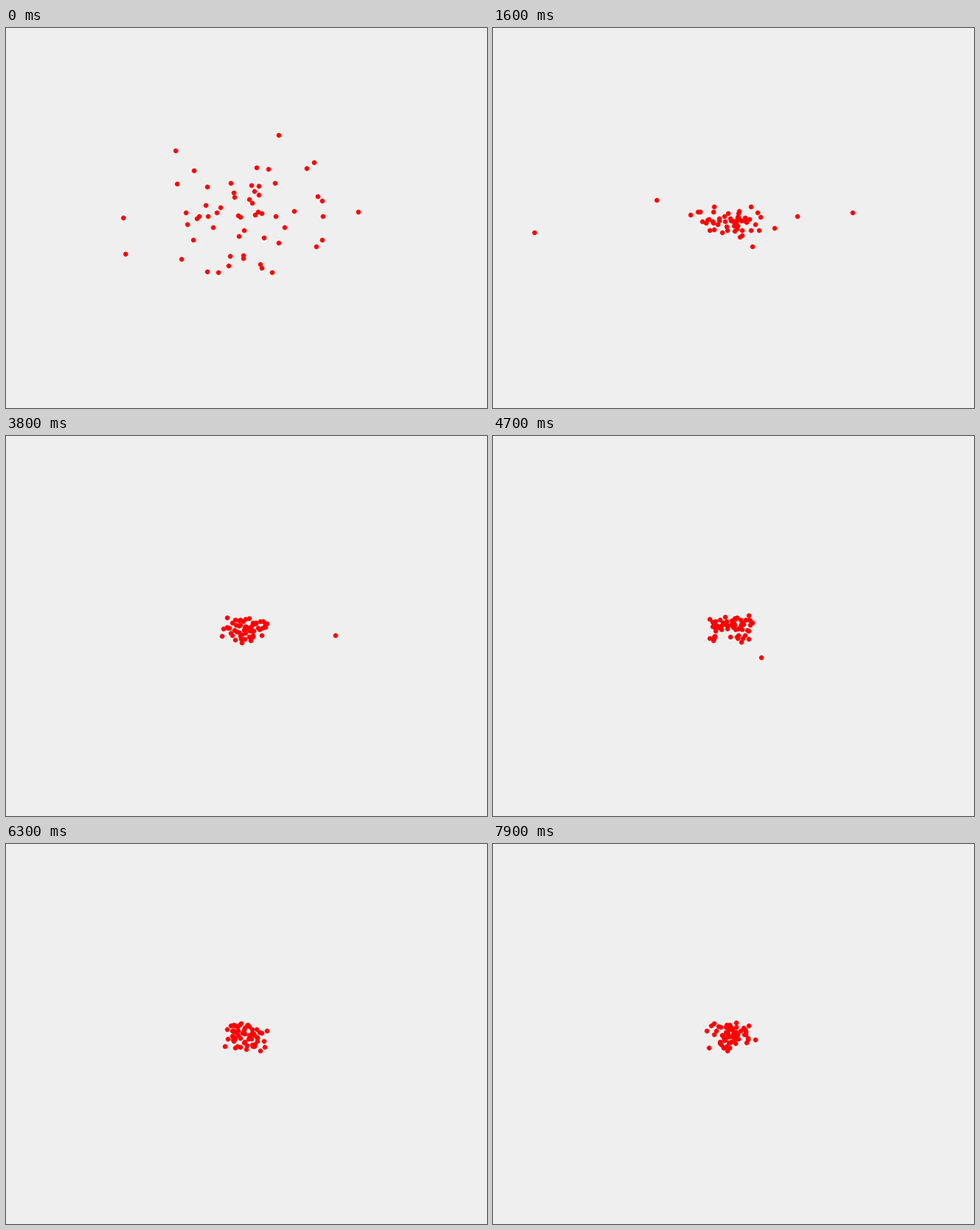
A matplotlib script for the animation above (8000 ms loop, 653 by 515 pixels).

```python
import numpy as np
import matplotlib.pyplot as plt
from matplotlib.animation import FuncAnimation

W, H, DPI = 653, 515, 100
FRAMES, STEP = 80, 100
DOTS = 59
CENTER = np.array([321, 260])
RED, PAPER = "#ff0000", "#efefef"

# Slow strays: (step, x, y) key points before each joins the swarm
STRAYS = [
    [(0, 162, 306), (8, 97, 282), (16, 56, 277), (28, 4, 284), (36, 275, 265)],
    [(0, 159, 257), (8, 174, 246), (16, 222, 233), (27, 290, 224), (29, 298, 234)],
    [(0, 478, 249), (8, 487, 249.5), (16, 487.5, 250), (29, 495, 253),
     (36, 465, 264), (47, 364, 299.5), (50, 350, 307)],
    [(0, 430, 254.5), (8, 431, 226.5), (16, 412.5, 255)],
    [(0, 391, 247.5), (8, 412, 270.5), (16, 382, 270.5)],
    [(0, 272.5, 330), (8, 298, 306.5), (16, 351.5, 296)],
    [(0, 370, 144.5), (8, 322.5, 217.5)],
    [(0, 229.5, 165.5), (8, 254, 261.5), (16, 268, 252.5)],
]


def wander(rng):
    """Smoothed, softly limited noise for every step, dot and axis."""
    k = np.exp(-0.5 * (np.arange(-5, 6) / 1.4) ** 2)
    k /= np.sqrt((k ** 2).sum())
    raw = rng.normal(size=(FRAMES + len(k) - 1, DOTS, 2))
    smooth = sum(c * raw[i:i + FRAMES] for i, c in enumerate(k))
    return 2.4 * np.tanh(smooth / 2.2)


def follow(path, keys, ramp=4):
    """Move through the key points, then ease into the swarm."""
    s, x, y = np.array(keys, float).T
    t = np.arange(FRAMES)
    w = np.clip(1 - (t - s[-1]) / ramp, 0, 1)
    w = (w * w * (3 - 2 * w))[:, None]
    track = np.column_stack([np.interp(t, s, x), np.interp(t, s, y)])
    return path * (1 - w) + track * w


def swarm():
    """A wide cloud that contracts to a jittering cluster."""
    t = np.arange(FRAMES)[:, None, None]
    spread = [16.5, 9.5] + np.array([40, 28]) * np.exp(-t / [8, 6])
    pos = CENTER + spread * wander(np.random.default_rng(11))
    for i, keys in enumerate(STRAYS):
        pos[:, i] = follow(pos[:, i], keys)
    return pos


POS = swarm()

fig = plt.figure(figsize=(W / DPI, H / DPI), dpi=DPI, facecolor=PAPER)
ax = fig.add_axes([0, 0, 1, 1])
ax.set(xlim=(0, W), ylim=(H, 0))
ax.axis("off")
dots = ax.scatter(*POS[0].T, s=(6.5 * 72 / DPI) ** 2, c=RED, linewidths=0)


def draw(i):
    dots.set_offsets(POS[i])
    return dots,


anim = FuncAnimation(fig, draw, frames=FRAMES, interval=STEP,
                     repeat=True, repeat_delay=0, blit=False)
plt.show()
```
